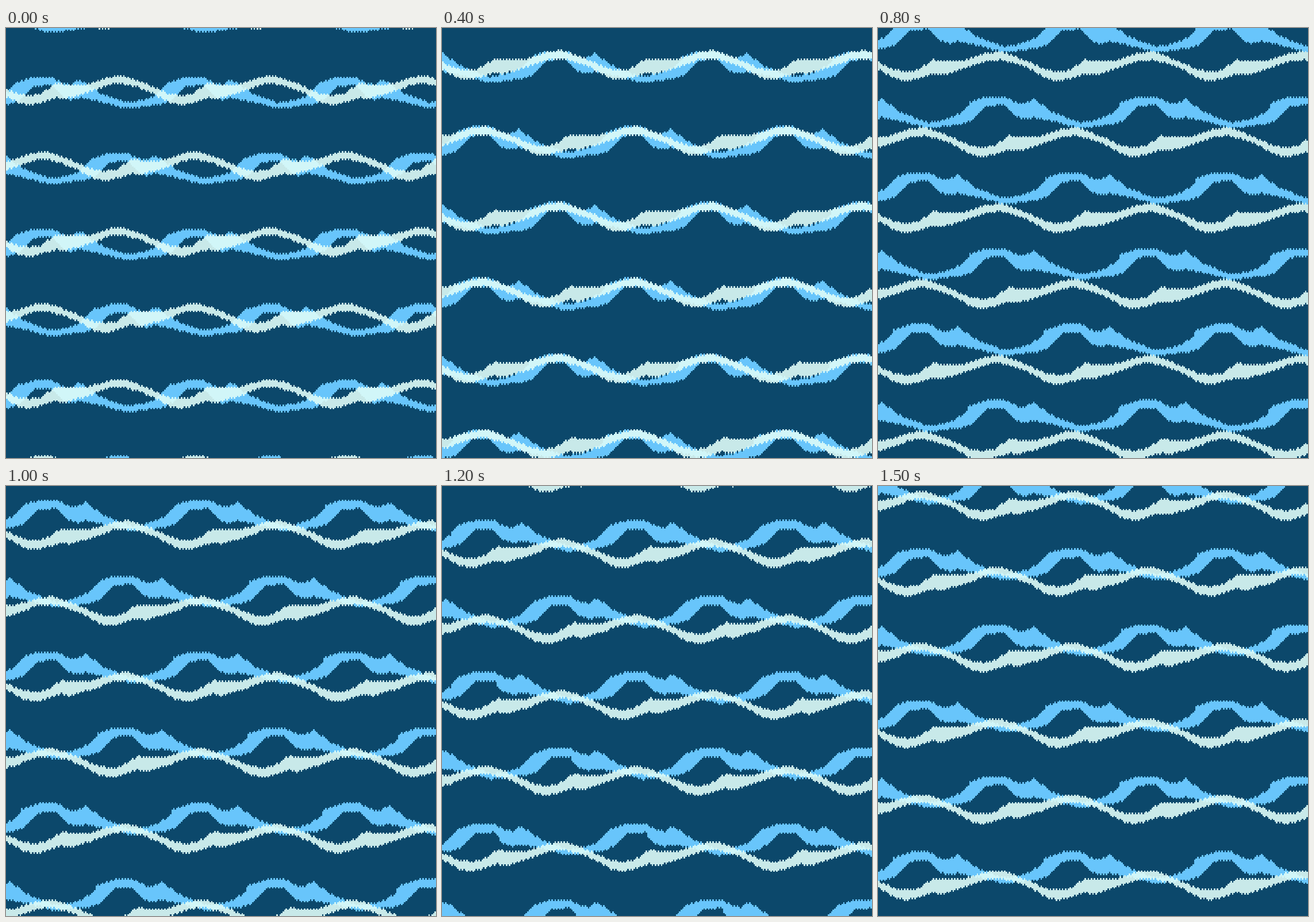
An HTML page with a canvas for the animation above (1600 ms loop, 748 px wide and 748 px high).

```html
<!DOCTYPE html>
<html>
<head>
<meta charset="utf-8">
<style>
  html, body { margin: 0; width: 100%; height: 100%; overflow: hidden; background: #0c486b; }
  canvas { display: block; width: 748px; height: 748px; image-rendering: pixelated; }
</style>
</head>
<body>
<canvas id="stage" width="283" height="283"></canvas>
<script>
const ctx = document.getElementById('stage').getContext('2d');
const COLS = 283, PX = 748 / COLS, PERIOD = 264, ROW = PERIOD / 2;

// Corners of each band over one period: [x, top, bottom]
const swell = {
  color: '#68c5fb',
  points: [[0, 35, 49], [13, 26, 48], [28, 9, 43], [58, 0, 16], [88, 0, 15], [107, 10, 35],
    [122, 13, 40], [137, 4, 36], [172, 28, 43], [218, 45, 55], [245, 41, 52]]
};
const foam = {
  color: 'rgba(221,251,248,.9)',
  points: [[0, 11, 22], [32, 25, 40], [52, 27, 44], [70, 25, 40], [98, 7, 31],
    [112, 8, 34], [150, 8, 23], [192, -5, 8], [215, -7, 7], [240, 1, 13]]
};

const mod = (a, n) => ((a % n) + n) % n;
const clamp = (v, lo, hi) => Math.min(hi, Math.max(lo, v));

function edges(points, x) {
  const next = points.findIndex(p => p[0] > x);
  const i = (next < 0 ? points.length : next) - 1;
  const [x0, top0, bottom0] = points[i];
  const [x1, top1, bottom1] = points[i + 1] || [PERIOD, points[0][1], points[0][2]];
  const u = (x - x0) / (x1 - x0);
  return [top0 + (top1 - top0) * u, bottom0 + (bottom1 - bottom0) * u];
}

function drawBand({ color, points }, dx, dy) {
  ctx.fillStyle = color;
  for (let col = 0; col < COLS; col++) {
    // Alternating parity gives the toothed edge
    const odd = col % 2;
    const snap = y => 2 * Math.round((y / PX - odd) / 2) + odd;
    for (let row = -2; row < 7; row++) {
      const x = mod((col + .5) * PX - dx - ROW * mod(row, 2), PERIOD);
      const y = mod(dy, PERIOD) + ROW * row;
      const [top, bottom] = edges(points, x).map(edge => snap(y + edge));
      ctx.fillRect(col, top, 1, bottom - top);
    }
  }
}

function frame(now) {
  const s = Math.floor(now % 1600 / 100);
  const drift = clamp((s - 2) * 2.5, 0, 10) - 10;
  // The swell sinks and slows; the foam bounces up, then rides on the swell
  const swellY = 85 + 22.6 * s - .227 * s * s;
  const foamY = s < 11 ? 90 - 16.8 * s + 1.45 * s * s : swellY - 225;
  ctx.fillStyle = '#0c486b';
  ctx.fillRect(0, 0, COLS, COLS);
  drawBand(swell, drift + 1, swellY);
  drawBand(foam, drift - 1.5, foamY);
  requestAnimationFrame(frame);
}
requestAnimationFrame(frame);
</script>
</body>
</html>
```
